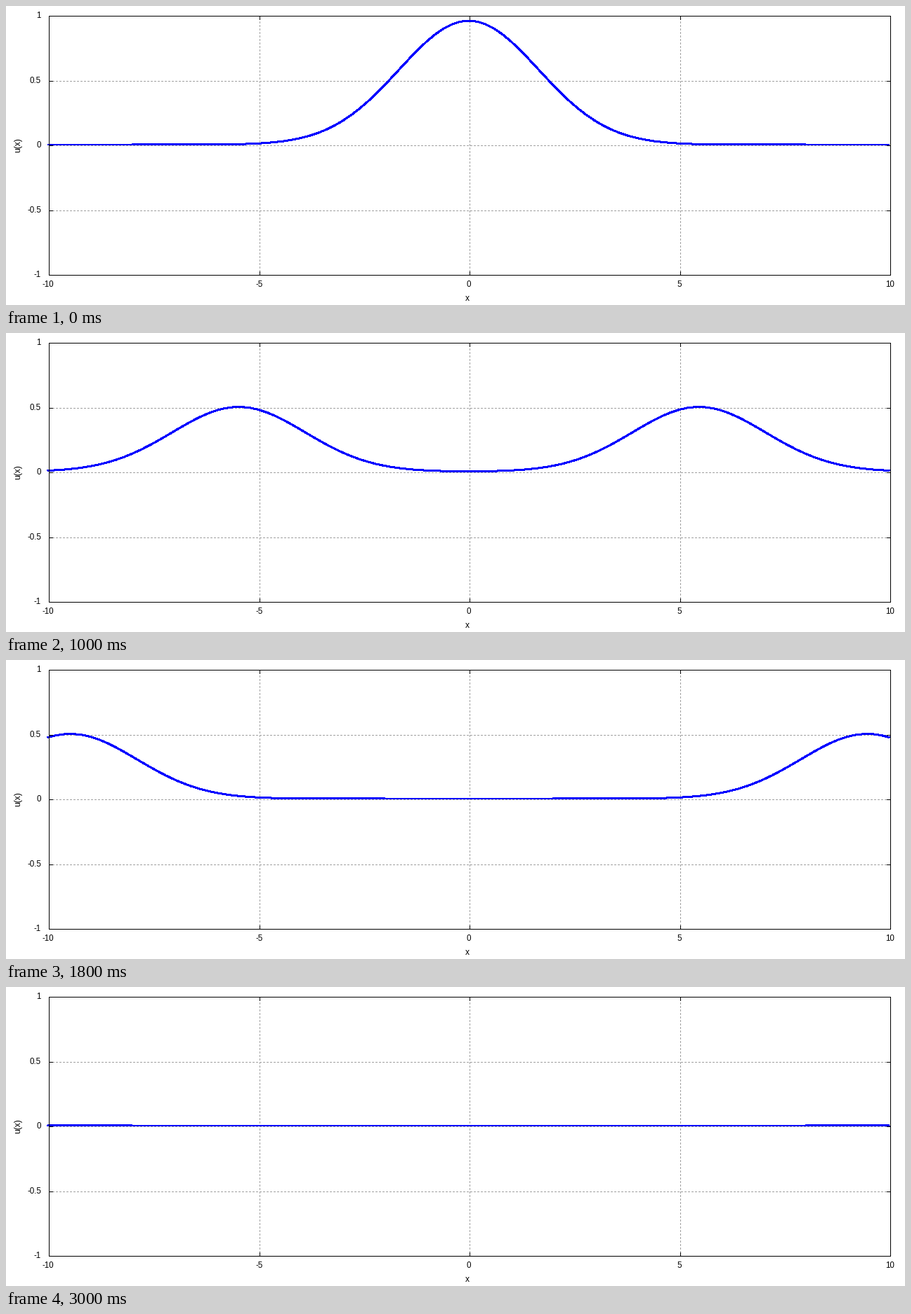
A matplotlib script for the animation above (4000 ms loop, 1280 by 427 pixels).

```python
import numpy as np
import matplotlib
import matplotlib.pyplot as plt
from matplotlib.animation import FuncAnimation
from matplotlib.patches import Rectangle

W, H, DPI = 1280, 427, 64   # a power of two keeps the pixel size exact
LEFT, RIGHT, TOP, BOTTOM = 60, 1258, 13, 383   # pixel columns and rows of the frame
STEPS, HOLD, INTERVAL = 30, 10, 100

matplotlib.rcParams["font.family"] = "Liberation Sans"
matplotlib.rcParams["path.simplify"] = False
matplotlib.rcParams["lines.dash_capstyle"] = "butt"


def pt(px):
    return px * 72 / DPI


def col(x):
    return LEFT + (x + 10) * (RIGHT - LEFT) / 20


def row(u):
    return BOTTOM - (u + 1) * (BOTTOM - TOP) / 2


fig = plt.figure(figsize=(W / DPI, H / DPI), dpi=DPI, facecolor="white")
ax = fig.add_axes([0, 0, 1, 1])
ax.set_xlim(0, W)
ax.set_ylim(H, 0)
ax.axis("off")


def segment(x0, y0, x1, y1, color="black", z=4, **style):
    ax.plot([x0 + 0.5, x1 + 0.5], [y0 + 0.5, y1 + 0.5], color=color, lw=pt(1),
            zorder=z, solid_capstyle="butt", antialiased=False, **style)


def label(x, y, text, px=11.5, **style):
    ax.text(x, y, text, fontsize=pt(px), color="black", **style)


GRID = dict(color="#a0a0a0", z=1, linestyle=(0, (2, 2)))
TICK = 5

for x in (-10, -5, 0, 5, 10):
    c = int(col(x) + 0.5)
    label(c + 0.2, 401, f"{x}", ha="center", va="baseline")
    if abs(x) < 10:
        segment(c, BOTTOM, c, TOP, **GRID)
        segment(c, BOTTOM, c, BOTTOM - TICK)
        segment(c, TOP, c, TOP + TICK)

for u in (-1, -0.5, 0, 0.5, 1):
    r = int(row(u) + 0.5)
    label(50, r + 4, f"{u:g}", ha="right", va="baseline")
    if abs(u) < 1:
        segment(LEFT, r, RIGHT, r, **GRID)
        segment(LEFT, r, LEFT + TICK, r)
        segment(RIGHT, r, RIGHT - TICK, r)

ax.add_patch(Rectangle((LEFT + 0.5, TOP + 0.5), RIGHT - LEFT, BOTTOM - TOP,
                       fill=False, ec="black", lw=pt(1), zorder=5,
                       antialiased=False, joinstyle="miter"))
label(657, 421, "x", px=12, ha="center", va="baseline")
label(17.5, 199, "u(x)", px=12, rotation=90, ha="center", va="center")

# Two half-height pulses travelling apart
xs = np.linspace(-10, 10, 101)
curve, = ax.plot([], [], color="#0000ff", lw=pt(2), antialiased=False,
                 zorder=3, snap=False, solid_joinstyle="round",
                 solid_capstyle="butt")


def pulse(x):
    return 0.5 * np.exp(-0.2 * x ** 2)


def draw(i):
    shift = 0.47 + 0.5 * min(i, STEPS)
    u = pulse(xs - shift) + pulse(xs + shift)
    px = col(xs)
    px[0] -= 1
    curve.set_data(px, row(u))
    return curve,


anim = FuncAnimation(fig, draw, frames=STEPS + HOLD, interval=INTERVAL,
                     repeat=True, repeat_delay=0, blit=False)
plt.show()
```
